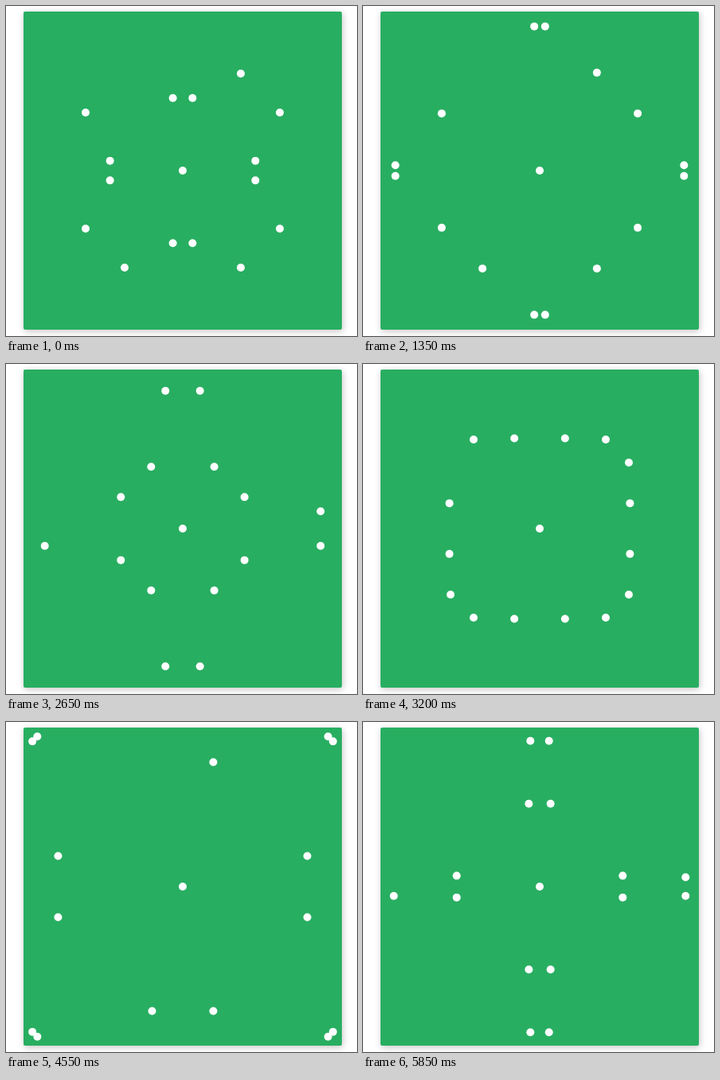
Animation, 441 px wide and 415 px high, one loop 5.9 s. Source, as an HTML page without scripts:

```html
<!DOCTYPE html>
<html lang="en">
<head>
<meta charset="utf-8">
<title>Bouncing dots</title>
<style>
  @property --n {
    syntax: "<number>";
    inherits: true;
    initial-value: 0;
  }

  html, body {
    margin: 0;
    width: 100%;
    height: 100%;
    overflow: hidden;
    background: #fff;
  }

  .card {
    position: absolute;
    left: 22px;
    top: 7px;
    width: 400px;
    height: 400px;
    border-radius: 2px;
    background: #28ae61;
    box-shadow: 1px 2px 8px rgba(0, 0, 0, .24);

    /* p runs back and forth along the diamond's sides, q along the star's */
    --dp: (max(var(--n) - 13.1, 13.1 - var(--n)) * 195 / 35);
    --p: max(min(var(--dp), 390 - var(--dp)), var(--dp) - 390);
    --dq: (max(var(--n) - 28.1, 28.1 - var(--n)) * 195 / 60);
    --q: min(var(--dq), 390 - var(--dq));
    animation: tick 5.9s -2ms infinite;
  }

  svg { display: block; }
  circle { fill: #fff; }

  .side-a { transform: translate(calc(var(--p) * 1px), calc((195 - var(--p)) * 1px)); }
  .side-b { transform: translate(calc((195 - var(--p)) * 1px), calc(var(--p) * 1px)); }
  .star-a { transform: translate(calc(var(--q) * 1px), calc((2 * var(--q) - 195) * 1px)); }
  .star-b { transform: translate(calc((2 * var(--q) - 195) * 1px), calc(var(--q) * 1px)); }

  /* one tick per 50 ms, with one tick held twice as long */
  @keyframes tick {
    0%        { --n: 0;  animation-timing-function: steps(24, end); }
    20.33898% { --n: 24; animation-timing-function: step-end; }
    22.03390% { --n: 25; animation-timing-function: steps(92, end); }
    100%      { --n: 117; }
  }
</style>
</head>
<body>
<div class="card">
  <svg width="400" height="400" viewBox="-200 -200 400 400">
    <defs>
      <g id="trio">
        <circle class="side-b" r="5"/>
        <circle class="star-a" r="5"/>
        <circle class="star-b" r="5"/>
      </g>
      <g id="quad">
        <circle class="side-a" r="5"/>
        <use href="#trio"/>
      </g>
    </defs>
    <circle r="5"/>
    <use href="#quad"/>
    <use href="#quad" transform="scale(-1 1)"/>
    <use href="#quad" transform="scale(1 -1)"/>
    <use href="#trio" transform="scale(-1 -1)"/>
  </svg>
</div>
</body>
</html>
```
